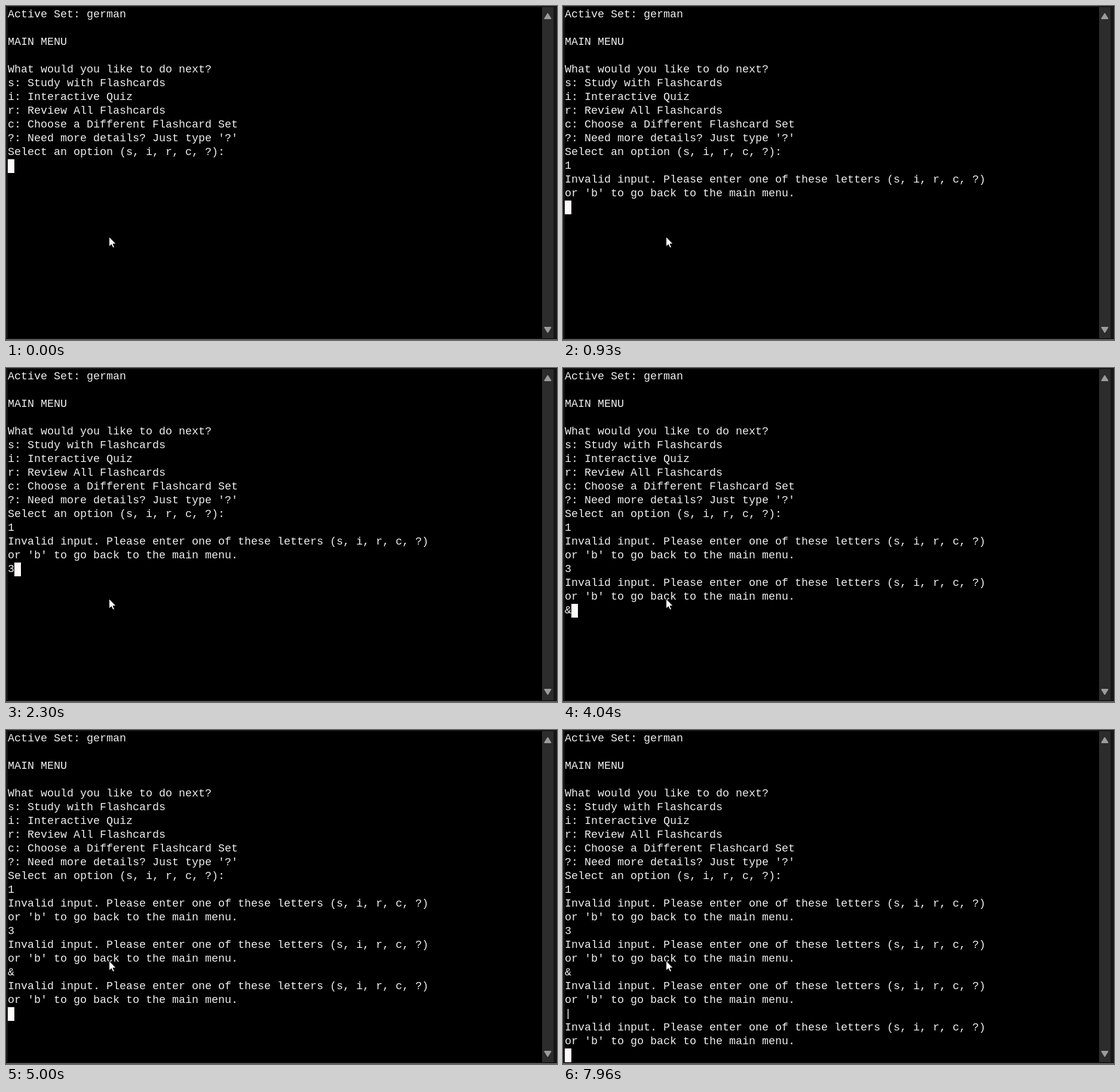
Write an HTML page that moves like this. It is 922 by 558 pixels and loops after 8000 ms.

```html
<!DOCTYPE html>
<html lang="en">
<head>
<meta charset="utf-8">
<title>Flashcard terminal</title>
<style>
  html, body {
    margin: 0;
    width: 100%;
    height: 100%;
    overflow: hidden;
    background: #000;
  }
  pre {
    position: absolute;
    left: 3px;
    top: 3px;
    margin: 0;
    font: 18.33px/23px "Liberation Mono", "Courier New", monospace;
    font-variant-ligatures: none;
    color: #f0f0f0;
  }
  svg {
    position: absolute;
    left: 0;
    top: 0;
    display: block;
  }
  /* The cursor hides its own cell; the curtain below it hides later rows. */
  .cursor {
    animation: type 8s step-end infinite;
  }
  @keyframes type {
    0%      { transform: translate(0, 0); }
    6.625%  { transform: translate(11px, 0); }
    11.625% { transform: translate(0, 69px); }
    28.75%  { transform: translate(11px, 69px); }
    34.125% { transform: translate(0, 138px); }
    50.5%   { transform: translate(11px, 138px); }
    62.5%   { transform: translate(0, 207px); }
    83.125% { transform: translate(11px, 207px); }
    99.5%, 100% { transform: translate(0, 276px); }
  }
</style>
</head>
<body>
<pre>Active Set: german

MAIN MENU

What would you like to do next?
s: Study with Flashcards
i: Interactive Quiz
r: Review All Flashcards
c: Choose a Different Flashcard Set
?: Need more details? Just type '?'
Select an option (s, i, r, c, ?):
1
Invalid input. Please enter one of these letters (s, i, r, c, ?)
or 'b' to go back to the main menu.
3
Invalid input. Please enter one of these letters (s, i, r, c, ?)
or 'b' to go back to the main menu.
&amp;
Invalid input. Please enter one of these letters (s, i, r, c, ?)
or 'b' to go back to the main menu.
|
Invalid input. Please enter one of these letters (s, i, r, c, ?)
or 'b' to go back to the main menu.</pre>

<svg width="922" height="558" viewBox="0 0 922 558">
  <g class="cursor">
    <rect x="-12" y="279" width="940" height="300" fill="#000"/>
    <rect x="3" y="256" width="11" height="23" fill="#fffafa"/>
  </g>

  <!-- window edge -->
  <path d="M0 0H922V558H0ZM3 2V555H916V2Z" fill="#171717" fill-rule="evenodd"/>
  <rect y="557" width="922" height="1" fill="#888"/>

  <!-- scrollbar -->
  <rect x="897" y="2" width="19" height="553" fill="#2c2c2c"/>
  <g fill="#9c9c9c" stroke="#9c9c9c" stroke-width="2" stroke-linejoin="round">
    <path d="M906.5 13L911.5 21H901.5Z"/>
    <path d="M906.5 545L911.5 537H901.5Z"/>
  </g>

  <!-- mouse pointer -->
  <path transform="translate(172.5 385.5)" d="M0 0V16.5L3.8 13L6.5 18.5L9 17.4L6.5 12H11.6Z"
        fill="#fff" stroke="#000" stroke-width="1"/>
</svg>
</body>
</html>
```
